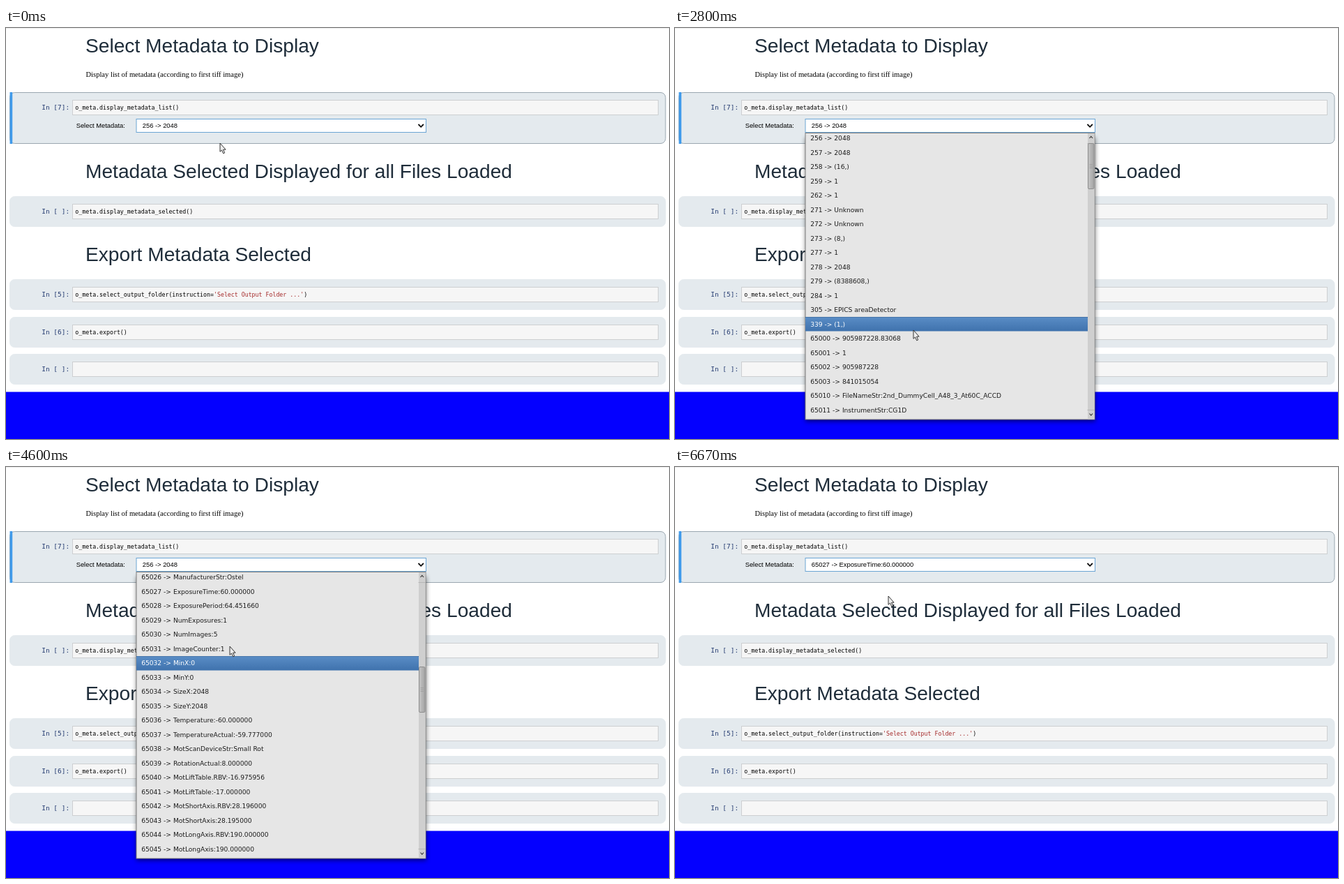
Animation, 951 px wide and 589 px high, one loop 9400 ms. Source, as an HTML page:

```html
<!DOCTYPE html>
<html lang="en">
<head>
<meta charset="utf-8">
<title>Select Metadata</title>
<style>
html, body { margin: 0; width: 100%; height: 100%; overflow: hidden; background: #fff; }
svg { display: block; }
text { white-space: pre; }
.head { font: 28.17px "Liberation Sans", Arial, sans-serif; fill: #1f2d3a; }
.note { font: 10.55px "Liberation Serif", "Times New Roman", serif; }
.code { font: 8.25px "DejaVu Sans Mono", monospace; }
.prompt { font: 9.45px "DejaVu Sans Mono", monospace; fill: #22396f; }
.label { font: 9.35px "Liberation Sans", Arial, sans-serif; }
.row { font: 9.12px "DejaVu Sans", sans-serif; fill: #1c1c1c; }
.row.on { fill: #fff; }
.str { fill: #a52a2a; }
</style>
</head>
<body>
<svg width="951" height="589" viewBox="0 0 951 589">
  <defs>
    <linearGradient id="blue" x2="0" y2="1">
      <stop stop-color="#5a8dc6"/><stop offset="1" stop-color="#3f72ad"/>
    </linearGradient>
    <linearGradient id="grip">
      <stop stop-color="#c6c6c6"/><stop offset="1" stop-color="#a4a4a4"/>
    </linearGradient>
    <clipPath id="view"><rect x="187" y="151" width="405" height="410"/></clipPath>
    <filter id="soft" x="-10%" y="-10%" width="120%" height="120%"><feGaussianBlur stdDeviation="3"/></filter>
  </defs>
  <path d="M0 .5H951" stroke="#eee"/>
  <text class="head" x="114" y="34.5">Select Metadata to Display</text>
  <text class="note" x="114.5" y="70">Display list of metadata (according to first tiff image)</text>
  <text class="head" x="114" y="214.5">Metadata Selected Displayed for all Files Loaded</text>
  <text class="head" x="114" y="333.5">Export Metadata Selected</text>
  <g id="cells"></g>
  <rect y="521.5" width="951" height="68" fill="#0400ff"/>
  <text class="label" x="100.7" y="143.4">Select Metadata:</text>
  <rect x="187" y="130.5" width="415.5" height="19" fill="#fff" stroke="#6ca5d4"/>
  <text class="label" id="value" x="195.8" y="143.4"></text>
  <path d="M591.5 138l3.7 3.8 3.7-3.8" fill="none" stroke="#111" stroke-width="1.8"/>
  <g id="popup">
    <rect x="187" y="157" width="416" height="407" fill="#000" opacity=".5" filter="url(#soft)"/>
    <rect x="187" y="150.5" width="415" height="410.5" fill="#e6e6e6" stroke="#7e7e7e"/>
    <g clip-path="url(#view)">
      <g id="list">
        <g id="mark">
          <rect x="187" width="405" height="20.5" fill="url(#blue)"/>
          <path d="M187 .5H592" stroke="#35608f" stroke-dasharray="1 1"/>
        </g>
      </g>
    </g>
    <rect x="592" y="151" width="9.5" height="409.5" fill="#cfcfcf"/>
    <path d="M591.5 165.5H602M591.5 547.5H602" stroke="#b5b5b5"/>
    <path d="M594.5 158l2.3-2.6 2.3 2.6M594.5 552.5l2.3 2.6 2.3-2.6" fill="none" stroke="#333" stroke-width="1.1"/>
    <g id="thumb">
      <rect x="592.5" y=".5" width="8.5" height="65" rx="1.5" fill="url(#grip)" stroke="#8c8c8c"/>
      <path d="M594.5 30.5h4.500m-4.500 2.500h4.500m-4.500 2.500h4.500" stroke="#999" stroke-width=".7"/>
    </g>
  </g>
  <path id="cursor" d="M0 0V12.300L2.500 10 4.700 14.800 6.700 13.900 4.600 9.200H8.100Z" fill="#eee" stroke="#333"/>
</svg>
<script>
const $ = id => document.getElementById(id);
const LOOP = 9400, TICK = 1000 / 15, ROW = 20.5, TOP = 147.75, LAG = 140;
const OPEN = 1470, CLOSE = 6670;

const cells = [
  [92, 74, '7', 'o_meta.display_metadata_list()'],
  [241, 44, ' ', 'o_meta.display_metadata_selected()'],
  [360, 44, '5', `o_meta.select_output_folder(instruction=<tspan class="str">'Select Output Folder ...'</tspan>)`],
  [414, 44, '6', 'o_meta.export()'],
  [467, 44, ' ', '']
];
$('cells').innerHTML = cells.map(([y, h, n, code], i) => `
  <rect x="5.5" y="${y + .5}" width="940.5" height="${h - 1}" rx="7" fill="#e4eaee" stroke="${i ? '#e4eaee' : '#9aa7b0'}"/>
  ${i ? '' : `<rect x="5.5" y="${y}" width="3.7" height="${h}" fill="#429bea"/>`}
  <rect x="95.5" y="${y + 11.5}" width="840" height="21" fill="#f6f6f6" stroke="#cdcfd1"/>
  <text class="prompt" x="51.3" y="${y + 24.8}">In [${n}]:</text>
  <text class="code" x="99.3" y="${y + 24.5}">${code}</text>`).join('');

const tags = ['256 2048', '257 2048', '258 (16,)', '259 1', '262 1', '271 Unknown', '272 Unknown',
  '273 (8,)', '277 1', '278 2048', '279 (8388608,)', '284 1', '305 EPICS areaDetector', '339 (1,)',
  '65000 905987228.83068', '65001 1', '65002 905987228', '65003 841015054',
  '65010 FileNameStr:2nd_DummyCell_A48_3_At60C_ACCD'];
const more = ['InstrumentStr:CG1D', 'FileType:1', 'FileIndex:1', 'SampleStr:Cell', 'NotesStr:None',
  'ScanIndex:1', 'ScanSize:478', 'DataAcqModeStr:White Beam', 'DataTypeStr:Raw', 'GroupID:56497',
  'GroupSize:478', 'RunNo:56497', 'FrameIndex:1', 'FrameSize:478', 'ModelStr:KR427_TN',
  'ManufacturerStr:Ostel', 'ExposureTime:60.000000', 'ExposurePeriod:64.451660', 'NumExposures:1',
  'NumImages:5', 'ImageCounter:1', 'MinX:0', 'MinY:0', 'SizeX:2048', 'SizeY:2048',
  'Temperature:-60.000000', 'TemperatureActual:-59.777000', 'MotScanDeviceStr:Small Rot',
  'RotationActual:8.000000', 'MotLiftTable.RBV:-16.975956', 'MotLiftTable:-17.000000',
  'MotShortAxis.RBV:28.196000', 'MotShortAxis:28.195000', 'MotLongAxis.RBV:190.000000',
  'MotLongAxis:190.000000'];
more.forEach((s, i) => tags.push(`${65011 + i} ${s}`));
const items = tags.map(s => s.replace(' ', ' -> '));
const rows = items.map((s, i) => {
  const el = document.createElementNS('http://www.w3.org/2000/svg', 'text');
  el.setAttribute('x', 194.2);
  el.setAttribute('y', 161.3 + i * ROW);
  el.textContent = s;
  $('list').append(el);
  return el;
});

// Keys: [time, value, ...]
const pointer = [[66, 307, 165], [1067, 273, 140], [1800, 273, 140], [2600, 342, 433], [3730, 342, 433],
  [4000, 334, 366], [4733, 318, 233], [5133, 315, 311], [5400, 313, 366], [5733, 311, 343], [6200, 306, 185]];
const scrolling = [[2800, 0], [3400, 524], [3600, 697]];

function at(keys, t) {
  const i = keys.findIndex(k => k[0] > t);
  if (i < 0) return keys.at(-1).slice(1);
  if (!i) return keys[0].slice(1);
  const a = keys[i - 1], b = keys[i], p = (t - a[0]) / (b[0] - a[0]);
  return a.slice(1).map((v, j) => v + (b[j + 1] - v) * p);
}
const move = (id, x, y) => $(id).setAttribute('transform', `translate(${x} ${y})`);
const show = (id, on) => $(id).style.display = on ? '' : 'none';

function draw(now) {
  const time = now % LOOP;
  const t = Math.floor((time + 4) / TICK) * TICK;
  const [x, y] = at(pointer, t);
  const [scroll] = at(scrolling, t);
  const done = time >= CLOSE;
  move('cursor', Math.round(x), Math.round(y));
  show('popup', time >= OPEN && !done);
  $('value').textContent = items[done ? 35 : 0];

  const still = t < 2810 || t > 3700;
  const hover = Math.max(0, Math.floor((at(pointer, t - LAG)[1] + scroll - TOP) / ROW));
  show('mark', still);
  move('mark', 0, Math.round(TOP + hover * ROW));
  move('list', 0, -Math.round(scroll));
  move('thumb', 0, Math.round(165 + scroll * .1736));
  rows.forEach((r, i) => r.setAttribute('class', still && i === hover ? 'row on' : 'row'));
}

const start = performance.now();
(function frame() {
  draw(performance.now() - start);
  requestAnimationFrame(frame);
})();
</script>
</body>
</html>
```
